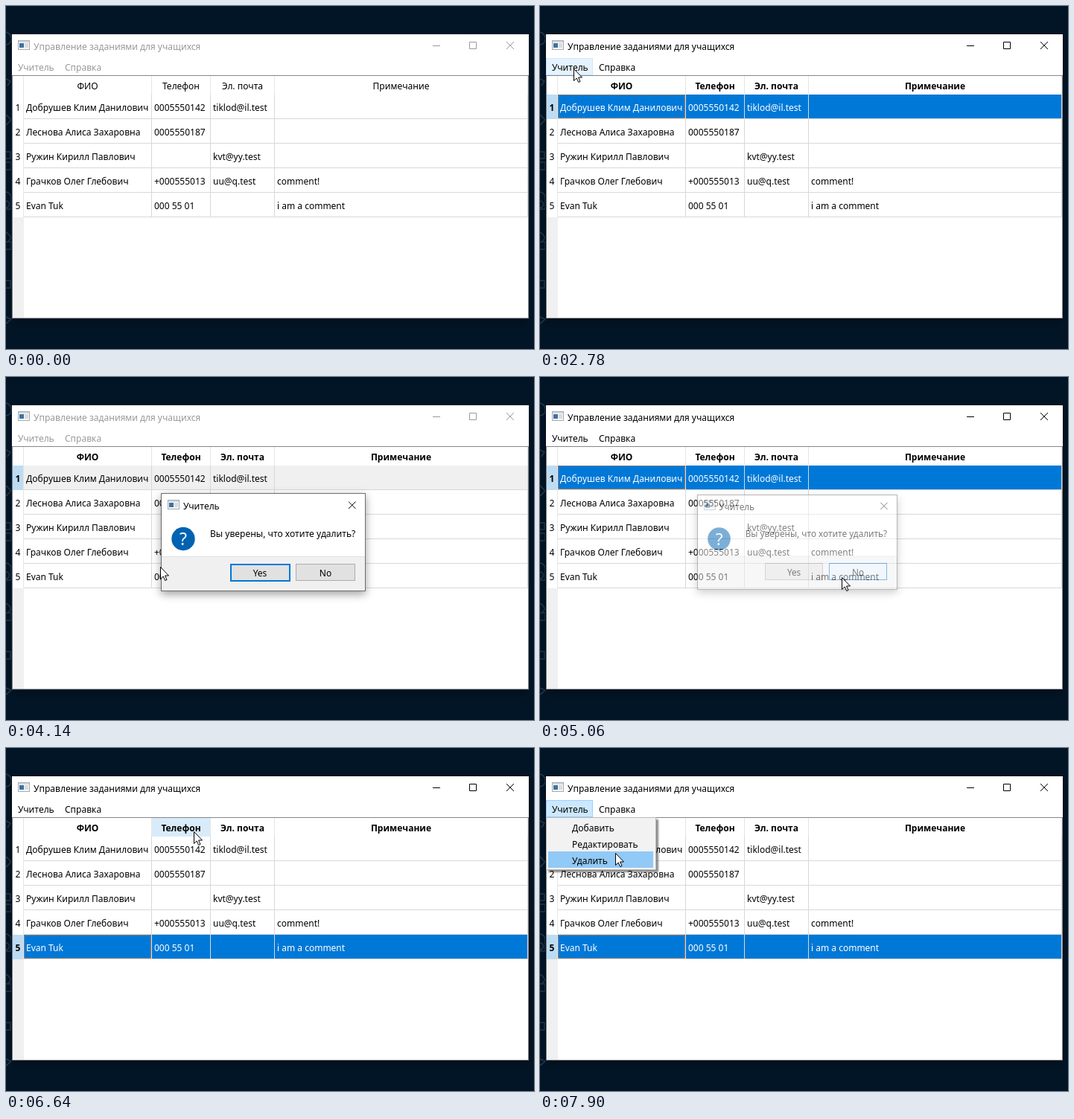
Write an HTML page that moves like this. It is 709 by 461 pixels and loops after 8000 ms.

```html
<!DOCTYPE html>
<html lang="ru">
<head>
<meta charset="utf-8">
<title>Управление заданиями</title>
<style>
html, body { margin: 0; width: 100%; height: 100%; overflow: hidden; background: #021526; }
svg { display: block; width: 709px; height: 461px; }
text { font: 12px "Noto Sans", "Open Sans", sans-serif; fill: #000; white-space: pre; }
rect { shape-rendering: crispEdges; }
.mid { text-anchor: middle; }
.ctl { fill: none; stroke: #000; }
.idle .chrome text { fill: #999; }
.idle .chrome .ctl { stroke: #999; }
.edge { fill: none; stroke: #020d18; }
.idle .edge { stroke: #0f1f2d; }
.picked .head text, .row.sel .num { font-weight: 700; }
.head rect, .bg, .numbg { fill: #fff; }
.head .hot rect, .row.hot .numbg { fill: #d9ebf9; }
.row.sel .numbg { fill: #bcdcf4; }
.row.sel .bg { fill: #0078d7; }
.row.sel .cell { fill: #fff; }
.focus { fill: none; stroke: none; }
.row.sel .focus { stroke: #ff8728; stroke-dasharray: 1 1; }
.idle .row.sel .bg { fill: #f0f0f0; }
.idle .row.sel .cell { fill: #000; }
.idle .row.sel .focus { stroke: none; }
.tab { fill: none; stroke: none; }
.tab.hot { fill: #e5f3ff; stroke: #cce8ff; }
.tab.open { fill: #cce8ff; stroke: #99d1ff; }
.item rect { fill: none; }
.item.hot rect { fill: #91c9f7; }
.btn rect { fill: #e1e1e1; stroke: #adadad; }
.btn.main rect { stroke: #0078d7; stroke-width: 2; }
.btn.hot rect { fill: #e5f1fb; stroke: #0078d7; }
.btn.down rect { fill: #cce4f7; stroke: #005499; }
</style>
</head>
<body>
<svg id="stage" viewBox="0 0 709 461">
  <defs>
    <filter id="soft" x="-10%" y="-20%" width="120%" height="150%">
      <feDropShadow dx="0" dy="4" stdDeviation="6" flood-color="#000" flood-opacity=".38"/>
    </filter>
    <filter id="drop" x="-10%" y="-10%" width="120%" height="130%">
      <feDropShadow dx="3" dy="3" stdDeviation="1.3" flood-color="#000" flood-opacity=".45"/>
    </filter>
    <g id="icon">
      <rect width="16" height="13" fill="#a4abb1"/>
      <rect x="1" y="1" width="14" height="11" fill="#f5f6f7"/>
      <rect x="1" y="1" width="14" height="2" fill="#d3d8dc"/>
      <rect x="2" y="4" width="6" height="6" fill="#3f72a0"/>
      <rect x="9" y="4" width="5" height="6" fill="#d8dde1"/>
    </g>
  </defs>
  <rect width="709" height="461" fill="#021526"/>
  <g fill="none" stroke="#263b4e" stroke-width="1.5">
    <path d="M0 35q7 2 7 9t-7 8M0 98l6 3-4 6M0 146l7 7-7 7M0 196h6v9H0M0 210h7v10H0"/>
    <path d="M0 250q7 1 7 9v14H0M0 262a4 4 0 0 1 0 9M0 304l4 3 3 5-4 4M0 317h7v10H0M0 369h6v10H0M0 418l7 3-7 6"/>
  </g>
  <g id="win">
    <rect x="8" y="38" width="694" height="382" fill="#fff" filter="url(#soft)"/>
    <rect class="edge" x="7.5" y="37.5" width="695" height="383"/>
    <g class="chrome">
      <use href="#icon" x="16" y="46"/>
      <text x="37" y="59">Управление заданиями для учащихся</text>
      <path class="ctl" d="M573 53.5h10M622.5 48.5h9v9h-9zM672 48l10 10m0-10l-10 10"/>
      <rect id="tab" class="tab" x="8.5" y="70.5" width="62" height="22"/>
      <text x="16" y="87">Учитель</text>
      <text x="79" y="87">Справка</text>
    </g>
    <rect x="8.5" y="93.5" width="693" height="326" fill="#fff" stroke="#828790"/>
    <rect x="9" y="284" width="15" height="135" fill="#f0f0f0"/>
    <g id="head" class="head"></g>
    <g id="rows"></g>
    <g id="grid" fill="none" shape-rendering="crispEdges"></g>
  </g>
  <g id="menu">
    <rect x="8.5" y="93.5" width="147" height="70" fill="#f2f2f2" stroke="#b9b9b9" filter="url(#drop)"/>
  </g>
  <g id="dialog">
    <rect x="208" y="156" width="275" height="132" fill="#fff" filter="url(#soft)"/>
    <rect x="209" y="241" width="273" height="46" fill="#f0f0f0"/>
    <path d="M209 241.5h273" stroke="#dfdfdf"/>
    <rect x="208.5" y="156.5" width="274" height="131" fill="none" stroke="#6e6e6e"/>
    <use href="#icon" x="217" y="165"/>
    <text x="238" y="178">Учитель</text>
    <path class="ctl" d="M460 167.5l9.5 9.5m0-9.5l-9.5 9.5"/>
    <circle cx="238" cy="217.5" r="15.7" fill="#0063b1"/>
    <text class="mid" x="238" y="226" style="font-size:23px;fill:#fff">?</text>
    <text x="274" y="215">Вы уверены, что хотите удалить?</text>
    <g id="yes" class="btn"><rect x="301.5" y="251.5" width="79" height="22"/><text class="mid" x="341" y="268">Yes</text></g>
    <g id="no" class="btn"><rect x="389.5" y="251.5" width="79" height="22"/><text class="mid" x="429" y="268">No</text></g>
  </g>
  <g id="pointer">
    <path d="M.5.5V16.5L4.2 13 6.7 18.5 9 17.5 6.6 12H11.5z" fill="#fff" stroke="#000" stroke-linejoin="round"/>
    <circle id="ring" r="13.5" fill="#ffe000" opacity=".5"/>
  </g>
</svg>
<script>
const LOOP = 8000, TOP = 119, ROW = 33;
const $ = id => document.getElementById(id);
const clamp = (v, lo, hi) => Math.min(hi, Math.max(lo, v));

const columns = [
  { name: 'ФИО', x: 24, end: 195 },
  { name: 'Телефон', x: 196, end: 274 },
  { name: 'Эл. почта', x: 275, end: 360 },
  { name: 'Примечание', x: 361, end: 700 }
];
const people = [
  ['Добрушев Клим Данилович', '0005550142', 'tiklod@il.test', ''],
  ['Леснова Алиса Захаровна', '0005550187', '', ''],
  ['Ружин Кирилл Павлович', '', 'kvt@yy.test', ''],
  ['Грачков Олег Глебович', '+000555013', 'uu@q.test', 'comment!'],
  ['Evan Tuk', '000 55 01', '', 'i am a comment']
];
const commands = ['Добавить', 'Редактировать', 'Удалить'];

// Pointer moves: start, end, number of steps, points of the path
const moves = [
  [990, 1520, 8, [[795, 183], [560, 183], [300, 165], [150, 140], [125, 134]]],
  [2520, 2780, 5, [[125, 134], [112, 112], [75, 92], [45, 84]]],
  [2920, 3340, 7, [[45, 84], [45, 86], [55, 125], [69, 151], [70, 160]]],
  [3895, 4260, 6, [[70, 160], [100, 190], [207, 255], [351, 292]]],
  [4390, 4660, 5, [[351, 292], [380, 285], [405, 269]]],
  [5130, 5580, 7, [[405, 269], [330, 270], [200, 276], [98, 278]]],
  [5780, 6040, 4, [[98, 278], [55, 273], [22, 267]]],
  [6380, 6640, 5, [[22, 267], [120, 318], [327, 235], [252, 112]]],
  [6705, 6910, 4, [[252, 112], [120, 95], [45, 84]]],
  [7110, 7440, 6, [[45, 84], [45, 84], [70, 92], [98, 105]]],
  [7710, 7900, 3, [[98, 105], [101, 141]]]
];
const clicks = [[2050, 2180], [2920, 3000], [3530, 3600], [4930, 5000], [6180, 6240], [7110, 7180]];

function build() {
  $('head').innerHTML = columns.map(c =>
    `<g><rect x="${c.x}" y="94" width="${c.end - c.x}" height="25"/>` +
    `<text class="mid" x="${(c.x + c.end) / 2}" y="112">${c.name}</text></g>`).join('');

  $('rows').innerHTML = people.map((person, i) => {
    const y = TOP + i * ROW;
    const cells = person.map((s, c) => `<text class="cell" x="${columns[c].x + 3}" y="${y + 22}">${s}</text>`);
    const dots = `M24 ${y + 0.5}h171m-171 31h171M24.5 ${y}v32m170-32v32`;
    return `<g class="row"><rect class="numbg" x="9" y="${y}" width="14" height="33"/>` +
      `<rect class="bg" x="24" y="${y}" width="676" height="32"/>` +
      `<path class="focus" d="${dots}"/>` +
      `<text class="num mid" x="16" y="${y + 22}">${i + 1}</text>${cells.join('')}</g>`;
  }).join('');

  const across = people.map((_, i) => `M24 ${TOP + i * ROW + 32.5}H701`).join('');
  const down = columns.map(c => `M${c.end + 0.5} 119V284`).join('');
  const split = columns.map(c => `M${c.end + 0.5} 94V119`).join('');
  $('grid').innerHTML = `<path stroke="#d8d8d8" d="${across}${down}"/>` +
    `<path stroke="#e5e5e5" d="${split}M23.5 94V284"/>`;

  $('menu').insertAdjacentHTML('beforeend', commands.map((s, i) =>
    `<g class="item"><rect x="11" y="${95 + i * 22}" width="141" height="22"/>` +
    `<text x="43" y="${112 + i * 22}">${s}</text></g>`).join(''));
}

// Catmull-Rom curve through evenly timed points
function spline(pts, p) {
  const last = pts.length - 1;
  const i = Math.min(last - 1, Math.floor(p * last));
  const f = p * last - i;
  const [a, b, c, d] = [-1, 0, 1, 2].map(k => pts[clamp(i + k, 0, last)]);
  return [0, 1].map(k => b[k] + f / 2 * (c[k] - a[k] +
    f * (2 * a[k] - 5 * b[k] + 4 * c[k] - d[k] + f * (3 * (b[k] - c[k]) + d[k] - a[k]))));
}

function pointerAt(t) {
  const move = moves.filter(m => m[0] <= t).pop();
  if (!move) return null;
  const [from, to, n, pts] = move;
  const step = Math.floor((t - from) / (to - from) * (n - 1) + 0.15);
  return spline(pts, Math.min(n, step + 1) / n);
}

const within = (t, from, to) => t >= from && t < to;
const show = (el, on) => { el.style.display = on ? '' : 'none'; };
const flag = (el, name, on) => el.classList.toggle(name, on);

function draw(t) {
  const pos = pointerAt(t);
  const [x, y] = pos || [-99, -99];
  const over = (x0, y0, x1, y1) => x >= x0 && x < x1 && y >= y0 && y < y1;
  const active = within(t, 2050, 3600) || t >= 5000;
  const selected = t < 2050 ? -1 : t < 6180 ? 0 : 4;
  const menuOpen = within(t, 2920, 3600) || t >= 7110;
  const free = active && !menuOpen;

  flag($('win'), 'idle', !active);
  flag($('win'), 'picked', selected >= 0);
  flag($('tab'), 'hot', free && over(8, 70, 71, 93));
  flag($('tab'), 'open', menuOpen);
  columns.forEach((c, i) => flag($('head').children[i], 'hot', free && over(c.x, 94, c.end, 119)));
  people.forEach((_, i) => {
    const row = $('rows').children[i], y0 = TOP + i * ROW;
    flag(row, 'sel', i === selected);
    flag(row, 'hot', free && over(9, y0, 24, y0 + ROW));
  });

  show($('menu'), menuOpen);
  document.querySelectorAll('.item').forEach((el, i) =>
    flag(el, 'hot', over(11, 95 + i * 22, 152, 117 + i * 22)));

  const opening = clamp((t - 3670) / 200, 0, 1);
  const closing = clamp((t - 4990) / 145, 0, 1);
  const ease = 1 - (1 - opening) ** 3;
  const size = (0.9 + 0.1 * ease) * (1 - 0.048 * closing);
  show($('dialog'), opening > 0 && closing < 1);
  $('dialog').setAttribute('opacity', ease * (1 - closing));
  $('dialog').setAttribute('transform',
    `translate(345.5 222) scale(${size}) translate(-345.5 -222)`);
  flag($('yes'), 'main', t < 4930);
  flag($('no'), 'hot', over(389, 251, 469, 274));
  flag($('no'), 'down', within(t, 4930, 5000));

  show($('pointer'), pos);
  $('pointer').setAttribute('transform', `translate(${Math.round(x)} ${Math.round(y)})`);
  show($('ring'), clicks.some(([from, to]) => within(t, from, to)));
}

build();
const start = performance.now();
function tick() {
  draw((performance.now() - start) % LOOP);
  requestAnimationFrame(tick);
}
tick();
</script>
</body>
</html>
```
